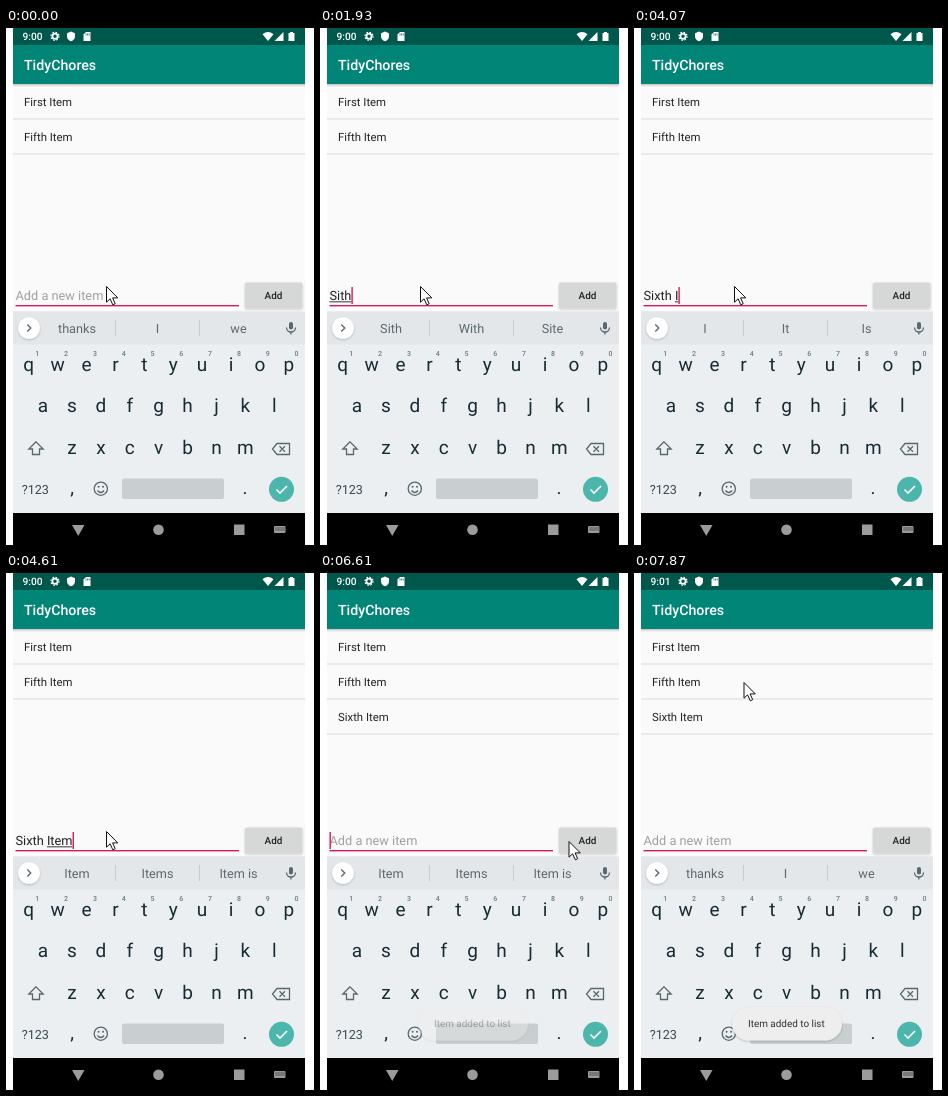
An HTML page for the animation above (8 s loop, 308 by 517 pixels).

```html
<!DOCTYPE html>
<html lang="en">
<head>
<meta charset="utf-8">
<title>List app</title>
<style>
  html, body { margin: 0; width: 100%; height: 100%; overflow: hidden; background: #fff; }
  svg { display: block; width: 100%; height: 100%; }
  text { font-family: Roboto, sans-serif; white-space: pre; text-rendering: geometricPrecision; }
  .row { font-size: 11.36px; fill: #242424; }
  .field { font-size: 12.78px; }
  .tip { font-size: 12.7px; fill: #5d696f; text-anchor: middle; }
  .key { font-size: 19px; fill: #172b33; text-anchor: middle; }
  .digit { font-size: 7px; font-weight: 500; fill: #6d7a80; text-anchor: middle; }
  .icon { fill: none; stroke: #5a676d; stroke-width: 1.3; }
</style>
</head>
<body>
<svg viewBox="0 0 308 517">
  <defs>
    <linearGradient id="shade" x2="0" y2="1">
      <stop stop-color="#000" stop-opacity=".22"/>
      <stop offset="1" stop-color="#000" stop-opacity="0"/>
    </linearGradient>
    <filter id="soft" x="-20%" y="-30%" width="140%" height="170%">
      <feDropShadow dx="0" dy="1" stdDeviation="1" flood-opacity=".22"/>
    </filter>
  </defs>

  <rect x="7" width="292" height="517" fill="#fafafa"/>
  <rect x="7" y="17" width="292" height="39" fill="#008577"/>
  <rect x="7" y="56" width="292" height="3" fill="url(#shade)"/>
  <text x="18" y="42" font-size="14.2" font-weight="500" fill="#fff">TidyChores</text>

  <!-- status bar -->
  <rect x="7" width="292" height="17" fill="#00574b"/>
  <g fill="#fff">
    <text id="clock" x="16.5" y="12" font-size="10.2" font-weight="500"></text>
    <circle cx="49" cy="8.3" r="2.6" fill="none" stroke="#fff" stroke-width="1.8"/>
    <circle cx="49" cy="8.3" r="4" fill="none" stroke="#fff" stroke-width="1.2" stroke-dasharray="1.6 1.54"/>
    <path d="M65 3.6l4 1.6v3q0 3.5-4 5-4-1.5-4-5v-3z"/>
    <path d="M80 4h4.5v9H77.500V6.500z"/>
    <path d="M256.500 6.200Q262 1.800 267.500 6.200L262 13z"/>
    <path d="M277.500 4v9h-9z"/>
    <path d="M282.500 5h1.500V4h3v1h1.500v8h-6z"/>
  </g>
  <path d="M80 5.500v2M81.600 5.500v2M83.200 5.500v2" stroke="#00574b" stroke-width=".7"/>

  <g id="rows"></g>

  <!-- entry field and button -->
  <text id="hint" class="field" x="9.500" y="272" fill="#a0a0a0">Add a new item</text>
  <text id="typed" class="field" x="9.500" y="272" fill="#212121"></text>
  <rect id="composing" y="273.400" height=".9" fill="#212121"/>
  <rect x="9.500" y="277" width="223.500" height="1.400" fill="#d81b60"/>
  <rect id="caret" y="259" width="1.400" height="17" fill="#d81b60"/>
  <rect id="button" x="239" y="254.500" width="57.500" height="26" rx="1.500" filter="url(#soft)"/>
  <text x="267.500" y="271.300" font-size="9.940" font-weight="500" fill="#222" text-anchor="middle">Add</text>

  <!-- keyboard -->
  <rect x="7" y="283.500" width="292" height="202" fill="#eceff1"/>
  <rect x="7" y="283.500" width="292" height="33" fill="#e3e7e9"/>
  <circle cx="23" cy="300" r="10.800" fill="#fff" filter="url(#soft)"/>
  <path class="icon" d="M21.300 296.500l3.500 3.500-3.500 3.500"/>
  <path d="M109.500 292v16M193.500 292v16" stroke="#c6cccf"/>
  <g id="tips"></g>
  <rect x="283" y="294" width="4" height="7.500" rx="2" fill="#5a676d"/>
  <path class="icon" d="M280.500 299.500a4.500 4.500 0 0 0 9 0M284.900 304v2.600"/>
  <g id="keys"></g>
  <path class="icon" d="M30 413.800l-7.200 7.200h3.700v5.500h7V421h3.700z"/>
  <path class="icon" d="M271 415.500h12.500v11H271l-4.500-5.500zM273.500 418.300l5.500 5.500M279 418.300l-5.500 5.500"/>
  <text x="15.700" y="465.500" font-size="12.600" fill="#37474f">?123</text>
  <circle class="icon" cx="94.800" cy="460.700" r="6.600"/>
  <path class="icon" d="M91.500 462.500q3.300 4 6.600 0"/>
  <circle cx="92.600" cy="458.700" r="1" fill="#5a676d"/>
  <circle cx="97" cy="458.700" r="1" fill="#5a676d"/>
  <rect x="116" y="450.500" width="102" height="20.500" rx="2" fill="#c9ced0"/>
  <circle cx="275.500" cy="461.300" r="12.500" fill="#4db6ac"/>
  <path d="M270.500 461.500l3.500 3.500 7-7" fill="none" stroke="#fff" stroke-width="1.600"/>

  <!-- navigation bar -->
  <rect x="7" y="485" width="292" height="32"/>
  <g fill="#9b9b9b">
    <path d="M66 497h12.500l-6.250 11z"/>
    <circle cx="152.500" cy="501.700" r="5.300"/>
    <rect x="228" y="496.500" width="10.500" height="10.500"/>
    <rect x="268" y="498" width="11.500" height="7" rx="1"/>
  </g>
  <path d="M269.500 500h9M269.500 502h9" stroke="#000" stroke-width=".9" stroke-dasharray="1 1"/>

  <g id="toast">
    <rect x="98" y="434" width="110" height="33.500" rx="16.700" fill="#eeeeee" filter="url(#soft)"/>
    <text x="114" y="454.300" font-size="9.940" fill="#333">Item added to list</text>
  </g>
  <path id="pointer" d="M.5.5V16.200l3.600-3.400 2.700 6 2.400-1.100-2.600-5.800h5.200z" fill="#fff" stroke="#111" stroke-linejoin="round"/>
</svg>

<script>
const LOOP = 8000, ADDED = 6370, FIELD_X = 9.5;
const $ = id => document.getElementById(id);

// [time, committed text, word being typed, suggestions]
const typing = [
  [0, '', '', 'thanks|I|we'],
  [1340, '', 'S', 'S|So|She'],
  [1620, '', 'Si', 'Si|Sit|Since'],
  [1750, '', 'Sit', 'Sit|Sitting|Site'],
  [1930, '', 'Sith', 'Sith|With|Site'],
  [2330, '', 'Sit', 'Sit|Sitting|Site'],
  [2470, '', 'Si', 'Si|Sit|Since'],
  [2880, '', 'Six', 'Six|Sir|Sixth'],
  [3150, '', 'Sixt', 'Sixt|Sixth|Sixty'],
  [3270, '', 'Sixth', 'Sixth|Sixths|Faith'],
  [3700, 'Sixth ', '', 'Sixth|Sixths|Faith'],
  [3830, 'Sixth ', '', 'of|grade|and'],
  [4070, 'Sixth ', 'I', 'I|It|Is'],
  [4340, 'Sixth ', 'It', "It|It's|Its"],
  [4470, 'Sixth ', 'Ite', 'Ite|Item|Items'],
  [4610, 'Sixth ', 'Item', 'Item|Items|Item is'],
  [ADDED, '', '', 'Item|Items|Item is'],
  [6760, '', '', 'thanks|I|we']
];
const caretToggles = [120, 650, 1210, 5160, 5670, 6120, ADDED, 6870, 7330, 7870];
const pointerPath = [
  [0, 100, 258], [5290, 106, 259], [5410, 150, 265], [5540, 204, 271],
  [5670, 236, 270], [5820, 245, 269], [5970, 248.5, 268],
  [7060, 230, 198], [7180, 186, 152], [7330, 150, 128],
  [7450, 126, 115], [7580, 113, 110], [7720, 109.5, 109]
];
const toastFade = [[0, 0], [6610, .35], [6760, .8], [6900, 1]];
const buttonTone = [[0, '#d6d7d7'], [6240, '#cbcccc'], [6490, '#d6d7d7']];

const stepAt = (table, t) => table.findLast(step => step[0] <= t);

function add(parent, tag, attrs, content = '') {
  const node = document.createElementNS('http://www.w3.org/2000/svg', tag);
  for (const name in attrs) node.setAttribute(name, attrs[name]);
  node.textContent = content;
  return parent.appendChild(node);
}

function keyRow(letters, x, y) {
  [...letters].forEach((letter, i) =>
    add($('keys'), 'text', { class: 'key', x: x + i * 28.9, y }, letter));
}
keyRow('qwertyuiop', 22.7, 342.5);
keyRow('asdfghjkl', 37, 384.3);
keyRow('zxcvbnm', 66, 426.3);
keyRow(',', 66, 466);
keyRow('.', 239, 466);
[...'1234567890'].forEach((digit, i) =>
  add($('keys'), 'text', { class: 'digit', x: 31.3 + i * 28.8, y: 328 }, digit));

const rows = ['First Item', 'Fifth Item', 'Sixth Item'].map((label, i) => {
  const row = add($('rows'), 'g', {});
  add(row, 'text', { class: 'row', x: 18, y: 78 + i * 35 }, label);
  add(row, 'rect', { x: 7, y: 90.5 + i * 35, width: 292, height: 1, fill: '#dcdcdc' });
  return row;
});
const tips = [71, 151.5, 232.5].map(x => add($('tips'), 'text', { class: 'tip', x, y: 304.7 }));

const ruler = document.createElement('canvas').getContext('2d');
ruler.font = '127.8px Roboto, sans-serif';
const widthOf = text => ruler.measureText(text).width / 10;

const show = (node, visible) => node.setAttribute('visibility', visible ? 'visible' : 'hidden');

function render(t) {
  const [, done, word, words] = stepAt(typing, t);
  const start = FIELD_X + widthOf(done), end = FIELD_X + widthOf(done + word);
  $('typed').textContent = done + word;
  show($('hint'), !(done + word));
  $('composing').setAttribute('x', start);
  $('composing').setAttribute('width', end - start);
  $('caret').setAttribute('x', end);
  show($('caret'), caretToggles.filter(time => time <= t).length % 2);
  words.split('|').forEach((tip, i) => tips[i].textContent = tip);

  show(rows[2], t >= ADDED);
  $('clock').textContent = t < 7720 ? '9:00' : '9:01';
  $('button').setAttribute('fill', stepAt(buttonTone, t)[1]);
  $('toast').setAttribute('opacity', stepAt(toastFade, t)[1]);
  const [, x, y] = stepAt(pointerPath, t);
  $('pointer').setAttribute('transform', `translate(${x} ${y})`);
}

const began = performance.now();
function tick() {
  render((performance.now() - began) % LOOP);
  requestAnimationFrame(tick);
}
tick();
</script>
</body>
</html>
```
